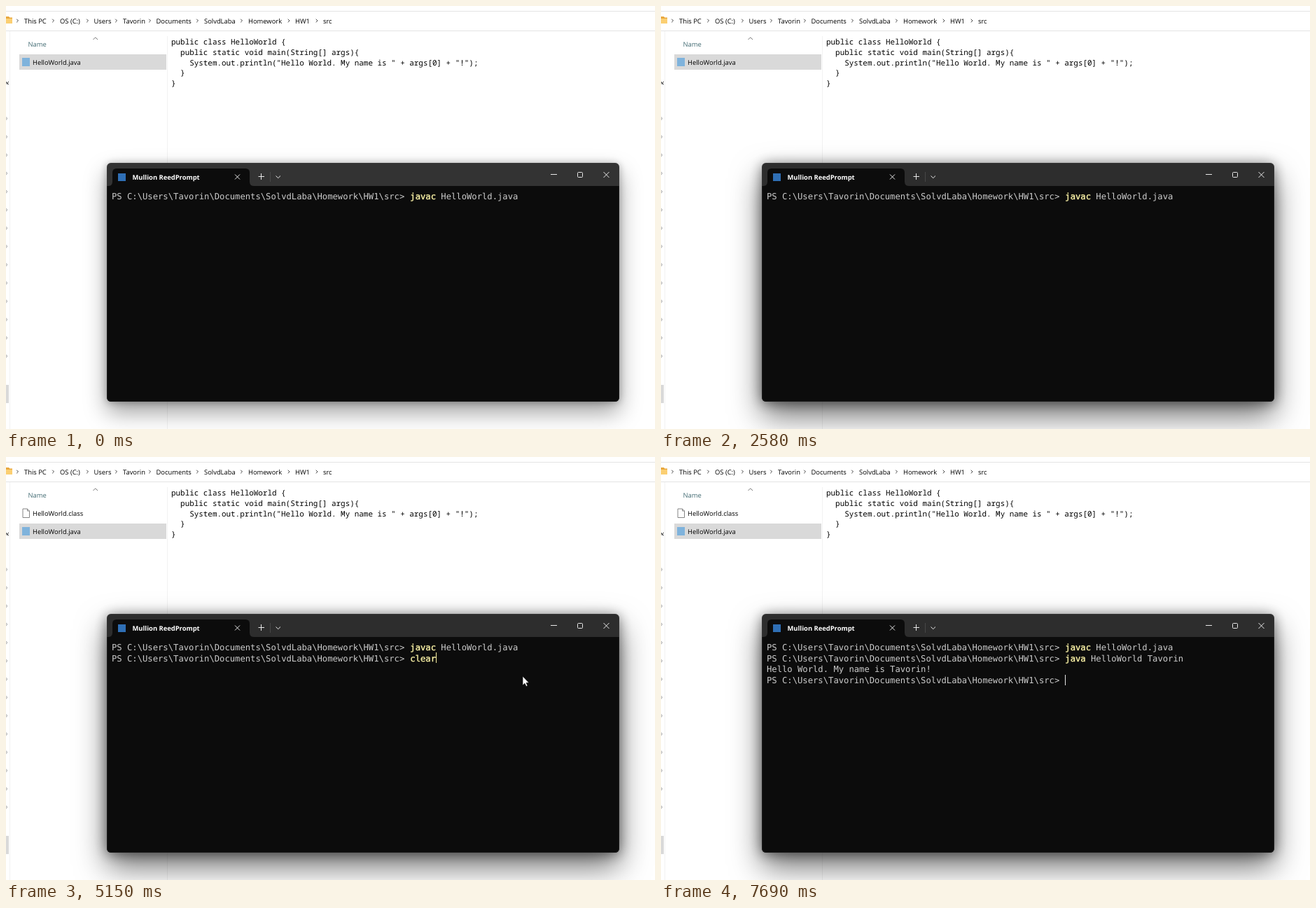
These frames come from a looping animation (927 by 604 pixels, 8000 ms). An HTML page:

```html
<!DOCTYPE html>
<html lang="en">
<head>
<meta charset="utf-8">
<title>Compile and run</title>
<style>
html, body { margin: 0; width: 100%; height: 100%; overflow: hidden; background: #fff; }
svg { position: absolute; left: 0; top: 0; width: 927px; height: 604px; }
text { text-rendering: geometricPrecision; white-space: pre; }
.ui { font: 9.4px "Open Sans", "Noto Sans", sans-serif; fill: #000; }
.code { font: 10.92px "Noto Sans Mono", monospace; fill: #000; }
.term { font: 12.2px "DejaVu Sans Mono", monospace; fill: #ccc; }
.exe { fill: #f9f1a5; stroke: #f9f1a5; stroke-width: .4; }
.line { fill: none; stroke-width: 1; }

/* Every animation shares one 8 s loop; 1% = 80 ms. */
.window, .window *, .listing * { animation: 8s step-end infinite; }

.window {
  position: absolute; left: 144px; top: 224px; width: 732px; height: 341px;
  border-radius: 6px; animation-name: focus;
}
@keyframes focus {
  0% { background: #333; box-shadow: 0 15px 32px rgba(0,0,0,.38), 0 1px 12px rgba(0,0,0,.3); }
  10.25%, 100% { background: #2d2d2d; box-shadow: 0 20px 44px rgba(0,0,0,.56), 0 2px 18px rgba(0,0,0,.48); }
}
.window svg { left: -144px; top: -224px; }

.listing .java { animation-name: shift; }
@keyframes shift { 0% { transform: none; } 48%, 100% { transform: translateY(26px); } }
.listing .class { animation-name: compiled; }
@keyframes compiled { 0% { opacity: 0; } 48%, 100% { opacity: 1; } }

.window .prompt2 { animation-name: prompt2; }
@keyframes prompt2 { 0% { opacity: 0; } 35.625%, 100% { opacity: 1; } }
.window .recall1 { animation-name: recall1; }
@keyframes recall1 { 0%, 64.375%, 100% { opacity: 0; } 57% { opacity: 1; } }
.window .recall2 { animation-name: recall2; }
@keyframes recall2 { 0%, 71.125%, 100% { opacity: 0; } 64.375% { opacity: 1; } }
.window .recall3 { animation-name: recall3; }
@keyframes recall3 { 0% { opacity: 0; } 71.125%, 100% { opacity: 1; } }
.window .output { animation-name: output; }
@keyframes output { 0% { opacity: 0; } 95.25%, 100% { opacity: 1; } }
.window .prompt3 { animation-name: prompt3; }
@keyframes prompt3 { 0% { opacity: 0; } 96.125%, 100% { opacity: 1; } }

.window .caret { fill: #e6e6e6; animation-name: caret; }
@keyframes caret {
  0% { transform: translate(732px, 264px); opacity: 0; }
  10.25% { transform: translate(732px, 264px); opacity: 1; }
  18.875% { transform: translate(732px, 264px); opacity: 0; }
  24.75% { transform: translate(151px, 279px); opacity: 1; }
  32.25% { transform: translate(151px, 279px); opacity: 0; }
  38.875% { transform: translate(577px, 279px); opacity: 1; }
  45.625% { transform: translate(577px, 279px); opacity: 0; }
  52.875% { transform: translate(577px, 279px); opacity: 1; }
  57% { transform: translate(732px, 279px); opacity: 1; }
  64.375% { transform: translate(614px, 279px); opacity: 1; fill: #f9f1a5; }
  71.125% { transform: translate(746px, 279px); opacity: 1; fill: #e6e6e6; }
  78.5% { transform: translate(746px, 279px); opacity: 0; }
  84.375% { transform: translate(746px, 279px); opacity: 1; }
  92.875% { transform: translate(151px, 295px); opacity: 1; }
  95.25% { transform: translate(151px, 295px); opacity: 0; }
  96.125%, 100% { transform: translate(577px, 311px); opacity: 1; }
}

.window .mouse { animation-name: path; animation-timing-function: linear; }
@keyframes path {
  0%, 2.125% { transform: translate(790px, 545px); }
  3.2% { transform: translate(745px, 495px); }
  4.6% { transform: translate(688px, 441px); }
  5.8% { transform: translate(660px, 401px); }
  7.1% { transform: translate(687px, 363px); }
  8.4% { transform: translate(730px, 320px); }
  9.4%, 40% { transform: translate(742px, 309px); }
  42.1%, 84.375% { transform: translate(738px, 313px); }
  86.8%, 100% { transform: translate(729px, 336px); }
}
.window .arrow { animation-name: arrow; }
@keyframes arrow {
  0%, 23.75%, 91.875%, 100% { opacity: 0; }
  2.125%, 40% { opacity: 1; }
}
.window .click { animation-name: click; }
@keyframes click { 0%, 12.25%, 100% { opacity: 0; } 10.25% { opacity: 1; } }
</style>
</head>
<body>
<svg viewBox="0 0 927 604">
  <defs>
    <path id="sep" class="line" d="M-1.3 -2.3L1 0L-1.3 2.3" stroke="#444"/>
    <pattern id="pins" width="4" height="26.1" y="148" patternUnits="userSpaceOnUse">
      <path class="line" d="M0 10.6L1.7 12.6L0 14.6" stroke="#aaa"/>
    </pattern>
  </defs>

  <g class="line" stroke="#e4e4e4">
    <path d="M0 7.5H927M0 35.5H927"/>
    <path d="M5.5 36V604M230.5 43V604" stroke="#f2f2f2"/>
  </g>

  <path d="M0 15H4L5.5 16.5H9V25H0Z" fill="#e9a83d"/>
  <path d="M0 18H9V25H0Z" fill="#fbcf72"/>
  <use href="#sep" x="16.5" y="21"/><use href="#sep" x="67.5" y="21"/>
  <use href="#sep" x="116.5" y="21"/><use href="#sep" x="157.5" y="21"/>
  <use href="#sep" x="205.5" y="21"/><use href="#sep" x="273.5" y="21"/>
  <use href="#sep" x="336.5" y="21"/><use href="#sep" x="404" y="21"/>
  <use href="#sep" x="444" y="21"/>
  <g class="ui">
    <text x="26" y="24.5">This PC</text>
    <text x="77" y="24.5">OS (C:)</text>
    <text x="125.5" y="24.5">Users</text>
    <text x="167" y="24.5">Tavorin</text>
    <text x="214.5" y="24.5">Documents</text>
    <text x="283" y="24.5">SolvdLaba</text>
    <text x="346" y="24.5">Homework</text>
    <text x="413" y="24.5">HW1</text>
    <text x="453" y="24.5">src</text>
    <text x="31.5" y="58" style="fill:#416a72">Name</text>
  </g>
  <path class="line" d="M124.5 48L127.7 44.8L131 48" stroke="#777"/>

  <path class="line" d="M0 108L2 112M4 108L1.5 110L4 112" stroke="#333"/>
  <rect y="148" width="3" height="365" fill="url(#pins)"/>
  <rect y="541" width="4" height="26" fill="#d9d9d9"/>

  <g class="listing ui">
    <g class="class">
      <path class="line" d="M24 74H30.5L33.5 77V86.5H24Z M30.5 74V77H33.5" stroke="#858585" style="fill:#fdfdfd"/>
      <text x="38" y="84">HelloWorld.class</text>
    </g>
    <g class="java">
      <rect x="19" y="69" width="210" height="22" fill="#d9d9d9"/>
      <rect x="23" y="74" width="11" height="12" fill="#7fb3dc"/>
      <text x="38" y="83.7">HelloWorld.java</text>
    </g>
  </g>

  <g class="code">
    <text x="236" y="55.3">public class HelloWorld {</text>
    <text x="236" y="70">  public static void main(String[] args){</text>
    <text x="236" y="84.7">    System.out.println("Hello World. My name is " + args[0] + "!");</text>
    <text x="236" y="99.4">  }</text>
    <text x="236" y="114.1">}</text>
  </g>
</svg>

<div class="window">
  <svg viewBox="0 0 927 604">
    <path d="M144 257H876V559A6 6 0 0 1 870 565H150A6 6 0 0 1 144 559Z" fill="#0c0c0c"/>
    <path d="M146 257Q152 257 152 251V238Q152 232 158 232H342Q348 232 348 238V251Q348 257 354 257Z" fill="#0c0c0c"/>
    <rect class="line" x="144.5" y="224.5" width="731" height="340" rx="5.5" stroke="#484848" stroke-opacity=".3"/>
    <rect x="160" y="239" width="11" height="11" fill="#2f6fb5"/>
    <text class="ui" x="180.5" y="248" style="fill:#fff;font-weight:700">Mullion ReedPrompt</text>
    <g class="line" stroke="#e8e8e8">
      <path d="M327 240.5L334 247.5M334 240.5L327 247.5"/>
      <path d="M360.5 243.5H369M364.5 239V248"/>
      <path d="M385.5 242.5L388.7 245.7L392 242.5"/>
      <path d="M778 240.5H787"/>
      <rect x="816.5" y="237.5" width="7" height="7" rx="1"/>
      <path d="M853.5 237L861.5 245M861.5 237L853.5 245"/>
      <path d="M377.5 237V251" stroke="#484848"/>
    </g>

    <g class="term">
      <text x="151" y="276">PS C:\Users\Tavorin\Documents\SolvdLaba\Homework\HW1\src&gt;</text>
      <text x="577.3" y="276"><tspan class="exe">javac</tspan> HelloWorld.java</text>
      <text class="prompt2" x="151" y="291.5">PS C:\Users\Tavorin\Documents\SolvdLaba\Homework\HW1\src&gt;</text>
      <text class="recall1" x="577.3" y="291.5"><tspan class="exe">javac</tspan> HelloWorld.java</text>
      <text class="recall2" x="577.3" y="291.5"><tspan class="exe">clear</tspan></text>
      <text class="recall3" x="577.3" y="291.5"><tspan class="exe">java</tspan> HelloWorld Tavorin</text>
      <text class="output" x="151" y="307">Hello World. My name is Tavorin!</text>
      <text class="prompt3" x="151" y="322.5">PS C:\Users\Tavorin\Documents\SolvdLaba\Homework\HW1\src&gt;</text>
    </g>
    <rect class="caret" width="1" height="15"/>

    <g class="mouse">
      <circle class="click" cx="-.5" r="9.7" fill="#858585"/>
      <path class="arrow" d="M0 0V13L3 10.3L5 14.6L7 13.7L5.1 9.5H9Z" fill="#fff" stroke="#111" stroke-width=".7"/>
    </g>
  </svg>
</div>
</body>
</html>
```
